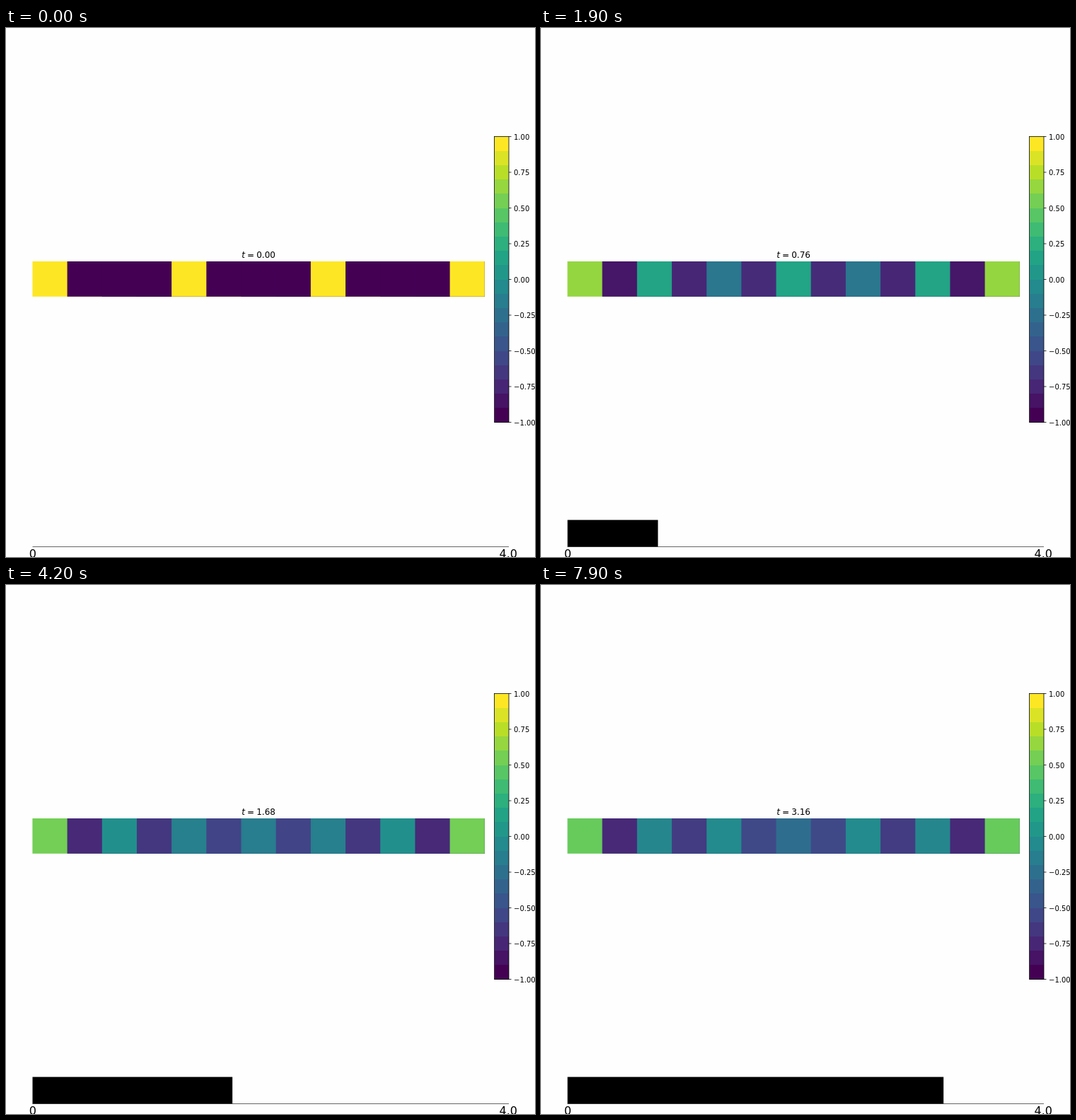
Write an HTML page that moves like this. It is 748x748 px and loops after 8000 ms.

```html
<!DOCTYPE html>
<html lang="en">
<head>
<meta charset="utf-8">
<title>Chain dynamics</title>
<style>
  html, body { margin: 0; width: 100%; height: 100%; overflow: hidden; background: #fefefe; }
  svg { display: block; width: 748px; height: 748px; font-family: "DejaVu Sans", sans-serif; }
</style>
</head>
<body>
<svg id="stage" viewBox="0 0 748 748"></svg>
<script>
const stage = document.getElementById('stage');

function add(tag, attrs, text = '') {
  const el = document.createElementNS('http://www.w3.org/2000/svg', tag);
  for (const key in attrs) el.setAttribute(key, attrs[key]);
  el.textContent = text;
  return stage.appendChild(el);
}

const rect = (x, y, width, height, fill, extra = {}) =>
  add('rect', { x, y, width, height, fill, ...extra });
const label = (x, y, size, text, extra = {}) =>
  add('text', { x, y, 'font-size': size, ...extra }, text);
const line = (x1, y1, x2, y2, width) =>
  add('line', { x1, y1, x2, y2, stroke: '#000', 'stroke-width': width });

const viridis = ['440154', '482475', '414487', '355f8d', '2a788e', '21918c',
  '22a884', '44bf70', '7ad151', 'bddf26', 'fde725']
  .map(hex => [0, 2, 4].map(i => parseInt(hex.slice(i, i + 2), 16)));

// Colour for a value between -1 and 1
function colour(value) {
  const pos = Math.max(0, Math.min(10, (value + 1) * 5));
  const i = Math.min(9, Math.floor(pos));
  const rgb = viridis[i].map((c, k) => Math.round(c + (viridis[i + 1][k] - c) * (pos - i)));
  return `rgb(${rgb})`;
}

// Each site leaves its start within a time `fall`, then a slow swing dies out to `rest`
const site = (start, rest, swing, fall) => t =>
  rest + (start - rest - swing) * Math.exp(-((t / fall) ** 3))
       + swing * Math.exp(-((t / 1.35) ** 2));

// Left half of the chain up to its middle; the right half mirrors it
const sites = [
  site(1, 0.53, 0.2, 0.45),
  site(-1, -0.77, 0, 0.84),
  site(-1, -0.08, 0.34, 0.29),
  site(-1, -0.65, -0.15, 0.6),
  site(1, -0.05, -0.4, 0.57),
  site(-1, -0.56, -0.2, 0.65),
  site(-1, -0.29, 0.62, 0.365),
];

// Every cell reaches to the right end and is covered by the next, so no seams show
const left = 37.4, right = 676.8, count = 13;
const cells = Array.from({ length: count }, (_, i) => {
  const x = left + (right - left) * i / count;
  return rect(x, 330, right - x, 49.8, '#000');
});

// Stepped colour bar
const bands = 20, bandHeight = 404 / bands;
for (let i = 0; i < bands; i++) {
  rect(690.5, 153.5 + i * bandHeight, 20.5, bandHeight,
    colour(1 - 2 * i / (bands - 1)), { 'shape-rendering': 'crispEdges' });
}
rect(690.5, 153.5, 20.5, 404, 'none', { stroke: '#000', 'stroke-width': 0.8 });
for (let i = 0; i <= 8; i++) {
  const y = 153.5 + 50.5 * i;
  line(711, y, 714.5, y, 0.8);
  label(718, Math.ceil(y + 3.7), 10, (1 - i / 4).toFixed(2).replace('-', '\u2212'));
}

// Title
label(333.3, 325, 12, 't', { 'font-style': 'oblique' });
label(341, 325, 12, '=');
const clock = label(354.2, 325, 12, '');

// Progress bar
const bar = rect(37.5, 695.6, 0, 37.9, '#000');
line(37.5, 733.5, 711, 733.5, 0.6);
label(37.8, 749, 16, '0', { 'text-anchor': 'middle' });
label(710.3, 749, 16, '4.0', { 'text-anchor': 'middle' });

function draw(now) {
  const t = Math.floor(now % 8000 / 100) * 0.04;
  cells.forEach((cell, i) =>
    cell.setAttribute('fill', colour(sites[Math.min(i, count - 1 - i)](t))));
  clock.textContent = t.toFixed(2);
  bar.setAttribute('width', 673 * t / 4);
  requestAnimationFrame(draw);
}
draw(performance.now());
</script>
</body>
</html>
```
